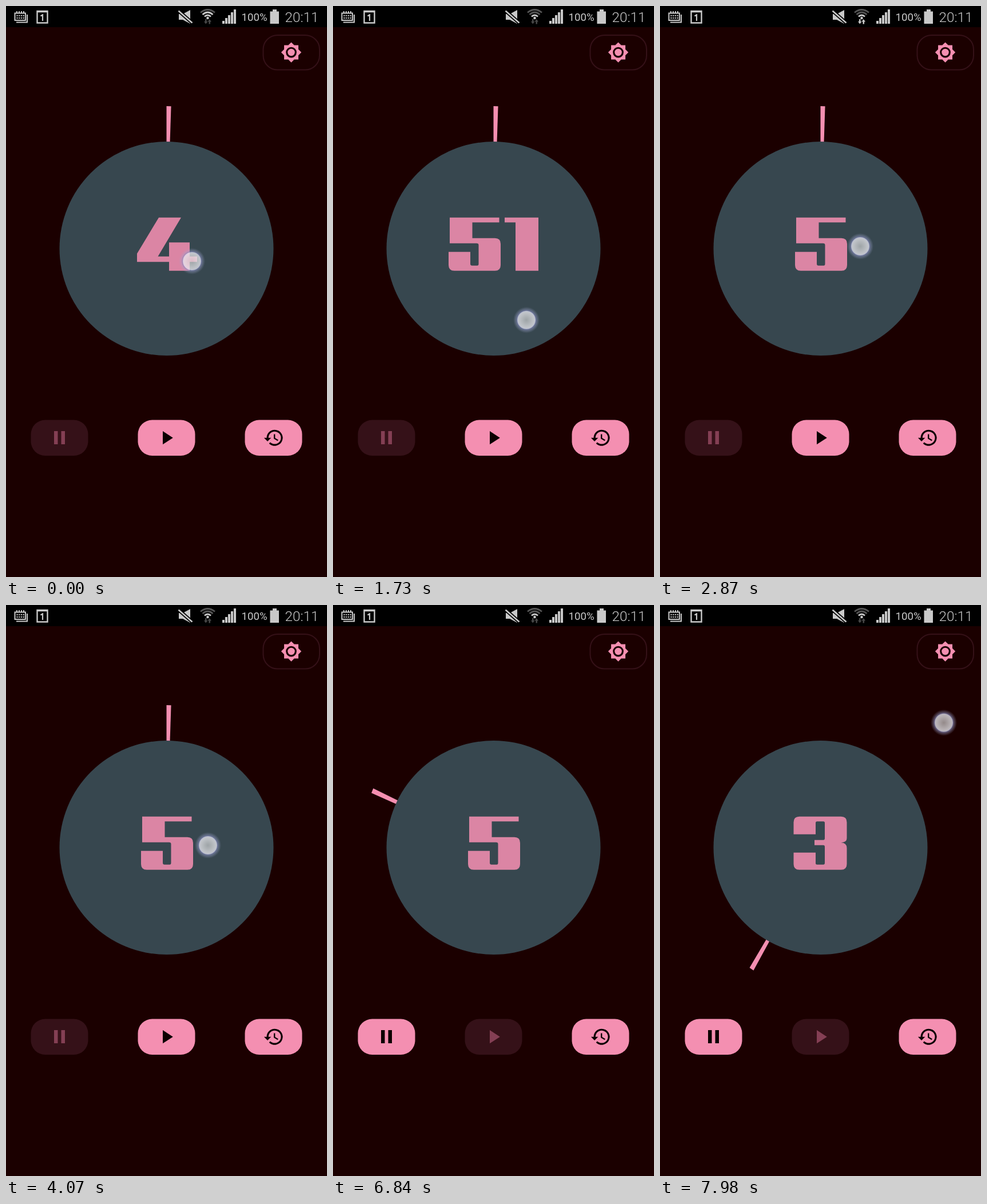
Animation of 561x998 px, one loop 8000 ms. Source, as an HTML page:

```html
<!DOCTYPE html>
<html lang="en">
<head>
<meta charset="utf-8">
<title>Countdown timer</title>
<style>
  html, body { margin: 0; width: 100%; height: 100%; overflow: hidden; background: #1b0000; }
  svg { display: block; width: 100%; height: 100%; }
  text { font-family: Roboto, "Noto Sans", sans-serif; fill: #c9c9c9; }
  .pink { fill: #f48fb1; }
  .button rect { fill: #f48fb1; }
  .button path { fill: #0c0000; }
  .button.off rect { fill: #351118; }
  .button.off path { fill: #843f54; }
</style>
</head>
<body>
<svg viewBox="0 0 561 998" preserveAspectRatio="none">
  <defs>
    <radialGradient id="glow">
      <stop offset="0" stop-color="#ddd" stop-opacity=".62"/>
      <stop offset=".58" stop-color="#e8e8ec" stop-opacity=".78"/>
      <stop offset=".67" stop-color="#e0e2f4" stop-opacity=".78"/>
      <stop offset=".72" stop-color="#8488be" stop-opacity=".62"/>
      <stop offset=".82" stop-color="#a0a6d2" stop-opacity=".32"/>
      <stop offset="1" stop-color="#a0a6d2" stop-opacity="0"/>
    </radialGradient>
  </defs>
  <rect width="561" height="998" fill="#1b0000"/>

  <!-- status bar -->
  <rect width="561" height="37" fill="#000"/>
  <g fill="none" stroke="#c9c9c9" stroke-width="2">
    <path d="M15.5 12.5H34V25H15.5ZM18 28.5H37V15"/>
    <path d="M18.5 17H32M18.5 21H32" stroke-dasharray="2.2 1.5"/>
    <path d="M19 9V13M23 9V13M27 9V13M31 9V13"/>
    <path d="M54.5 9H72.5V29.5H54.5ZM54 10H73" stroke-width="2.4"/>
    <path d="M60.5 17.5L64 15.5V26" stroke-width="2.2"/>
  </g>
  <g fill="#c9c9c9">
    <path d="M302 14H309L322 7V31L309 24H302Z"/>
    <path d="M301 8L326 30" stroke="#000" stroke-width="6"/>
    <path d="M301.5 8.5L325.500 29.500" stroke="#c9c9c9" stroke-width="2.5"/>
    <path d="M378 26H382V31H378ZM383 21H387V31H383ZM388 16H392V31H388ZM393 11H397V31H393ZM398 6H402V31H398Z"/>
    <path d="M461.500 9.500H466V6H473V9.500H477V31H461.500Z"/>
  </g>
  <g fill="none" stroke-width="2.800">
    <path d="M340 11.500Q352.500 1.500 365 11.500" stroke="#555"/>
    <path id="wave" d="M343.500 15Q352.500 7 361.500 15"/>
    <path d="M347 18.500Q352.500 13.500 358 18.500" stroke="#c9c9c9"/>
  </g>
  <circle cx="352.500" cy="21" r="2.300" fill="#c9c9c9"/>
  <path id="arrows" d="M348 23H350.500V27H352.500L349.200 31.500L346 27H348ZM354.500 31.500H357V27.500H359L355.700 23L352.500 27.500H354.500Z"/>
  <text x="411.500" y="26" font-size="18.700">100%</text>
  <text x="487.500" y="28" font-size="24.300" font-weight="300">20:11</text>

  <!-- brightness -->
  <rect x="449.500" y="51" width="98.500" height="60.500" rx="25" fill="none" stroke="#351118" stroke-width="2"/>
  <path class="pink" fill-rule="evenodd" transform="translate(479.800 62.300) scale(1.560)"
    d="M20 8.690V4H15.310L12 .690 8.690 4H4V8.690L.690 12 4 15.310V20H8.690L12 23.310 15.310 20H20V15.310L23.310 12ZM12 18a6 6 0 1 1 0-12a6 6 0 0 1 0 12ZM12 8a4 4 0 1 0 0 8a4 4 0 0 0 0-8Z"/>

  <!-- dial -->
  <path id="hand" class="pink"/>
  <circle cx="280.500" cy="424" r="187" fill="#37474f"/>
  <g id="number" class="pink" fill-rule="evenodd" opacity=".87" role="img"></g>

  <!-- controls -->
  <g id="pause" class="button">
    <rect x="43.500" y="723.500" width="100" height="62.500" rx="25"/>
    <path d="M84 743H90.500V766H84ZM96.500 743H103V766H96.500Z"/>
  </g>
  <g id="play" class="button">
    <rect x="230.500" y="723.500" width="100" height="62.500" rx="25"/>
    <path d="M274 743L291.800 754.700L274 766.300Z"/>
  </g>
  <g class="button">
    <rect x="417.500" y="723.500" width="100" height="62.500" rx="25"/>
    <path transform="translate(449.300 736) scale(1.560)"
      d="M13 3a9 9 0 0 0-9 9H1L4.960 16.030 9 12H6a7 7 0 1 1 2.060 4.940L6.640 18.360A9 9 0 1 0 13 3ZM12 8V13L16.280 15.540 17 14.330 13.500 12.250V8Z"/>
  </g>
  <circle id="touch" r="23" fill="url(#glow)"/>
</svg>
<script>
const LOOP = 8000, START = 5904, SECONDS = 5;
const CX = 280.5, CY = 424, RX = 231, RY = 249;
const $ = id => document.getElementById(id);

// Block numerals, 93 units tall
const OUTER = 'M10 0H83Q93 0 93 10V83Q93 93 83 93H10Q0 93 0 83V10Q0 0 10 0Z';
const slot = (top, bottom) => `M41 ${top}H52Q54.5 ${top} 54.5 ${top + 3}V${bottom - 3}Q54.5 ${bottom} 52 ${bottom}H41Q38.5 ${bottom} 38.5 ${bottom - 3}V${top + 3}Q38.5 ${top} 41 ${top}Z`;
const SIX = 'M10 0H83Q93 0 93 10V28H54.5V11Q54.5 8.5 52 8.5H41Q38.5 8.5 38.5 11V36H83Q93 36 93 46V83Q93 93 83 93H10Q0 93 0 83V10Q0 0 10 0Z' + slot(45, 84);
const glyph = (path, advance = 106, bearing = 6, turn = '') => ({ path, advance, bearing, turn });
const GLYPHS = [
  glyph(OUTER + slot(8.5, 84)),
  glyph('M0 0H59V93H19V8.5H0Z', 68, 0.5),
  glyph('M10 0H81Q91 0 91 10V40Q91 49 83 55L42 84H91V93H0V70L52.5 36V11Q52.5 8.500 50 8.500H41Q38.500 8.500 38.500 11V31H0V10Q0 0 10 0Z', 106, 8),
  glyph('M10 0H83Q93 0 93 10V38Q93 45 83 45.500Q93 46 93 55V83Q93 93 83 93H10Q0 93 0 83V63H38.500V82Q38.500 84 41 84H52Q54.500 84 54.500 81V53Q54.500 50 52 50H36.500V41H52Q54.500 41 54.500 38V11Q54.500 8.500 52 8.500H41Q38.500 8.500 38.500 11V31H0V10Q0 0 10 0Z'),
  glyph('M38 0H77L36.500 68H56V43.500H92V68H105V77.500H92V93H56V77.500H0V63Z', 110, 3.5),
  glyph('M2 0H88.500V8.500H41.500V36H81Q91 36 91 46V83Q91 93 81 93H10Q0 93 0 83V60H38V81Q38 84 41 84H50Q52.500 84 52.500 81V48Q52.500 45 49 45H2Z', 106, 8.5),
  glyph(SIX),
  glyph('M0 0H87V13L47 93H7L50 8.500H0Z', 90, 0.5),
  glyph(OUTER + slot(8.5, 41) + slot(50, 84)),
  glyph(SIX, 106, 6, ' rotate(180 46.5 46.5)')
];

// time, x, y, dialled value (wraps at 60)
const DRAG = [
  [0, 325, 446, 4], [50, 325, 446, 4], [400, 342, 348, 20],
  [840, 340, 469, 1.6], [960, 338, 501, -3], [1250, 337, 540, -7.6],
  [1600, 338, 558, -10], [1730, 338, 549, -9], [2100, 345, 490, -2],
  [2480, 350, 436, 3.7], [2870, 350, 420, 5], [3200, 351, 420, 5],
  [3350, 352, 426, 4], [3600, 353, 426, 4], [3750, 353, 420, 5], [4080, 353, 420, 5]
];
const TAP = [[5690, 303, 751], [5890, 303, 751]];
const LAST_TOUCH = [[7850, 496, 197], [8000, 496, 207]];

function sample(table, t) {
  const i = table.findIndex(row => row[0] > t);
  if (i < 0) return table.at(-1);
  if (i === 0) return table[0];
  const from = table[i - 1], to = table[i];
  const k = (t - from[0]) / (to[0] - from[0]);
  return from.map((v, n) => v + (to[n] - v) * k);
}

let shown;
function showNumber(value) {
  if (value === shown) return;
  shown = value;
  const digits = [...String(value)].map(d => GLYPHS[d]);
  let x = CX - digits.reduce((sum, g) => sum + g.advance, 0) / 2;
  $('number').innerHTML = digits.map(g => {
    const mark = `<path d="${g.path}" transform="translate(${x + g.bearing} 369.7)${g.turn}"/>`;
    x += g.advance;
    return mark;
  }).join('');
  $('number').setAttribute('aria-label', value);
}

function rim(degrees) {
  const a = degrees * Math.PI / 180;
  return `${CX + RX * Math.sin(a)} ${CY - RY * Math.cos(a)}`;
}

function draw(t) {
  const running = t >= START;
  const elapsed = running ? (t - START) / 1000 : 0;
  const dialled = (Math.round(sample(DRAG, t)[3]) + 60) % 60;
  showNumber(running ? Math.ceil(SECONDS - elapsed) : dialled);

  const angle = -elapsed * 360 / SECONDS;
  $('hand').setAttribute('d', `M${CX} ${CY}L${rim(angle)}L${rim(angle + 2)}Z`);
  $('pause').classList.toggle('off', !running);
  $('play').classList.toggle('off', running);

  const track = [DRAG, TAP, LAST_TOUCH].find(s => t >= s[0][0] && t < s.at(-1)[0]);
  $('touch').style.display = track ? '' : 'none';
  if (track) {
    const [, x, y] = sample(track, t);
    $('touch').setAttribute('transform', `translate(${x} ${y})`);
  }

  $('wave').setAttribute('stroke', t < 900 ? '#c9c9c9' : '#555');
  $('arrows').setAttribute('fill', t >= 2380 && t < 3400 ? '#c9c9c9' : '#484848');
}

const origin = performance.now();
function tick() {
  draw((performance.now() - origin) % LOOP);
  requestAnimationFrame(tick);
}
draw(0);
requestAnimationFrame(tick);
</script>
</body>
</html>
```
